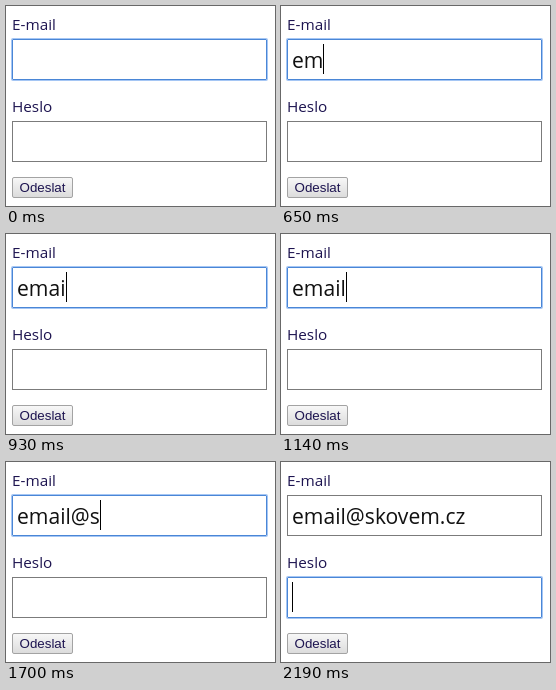
An HTML page that plays this animation: 269x200 px, repeating every 2680 ms.

```html
<!DOCTYPE html>
<html lang="cs">
<head>
<meta charset="utf-8">
<title>E-mail</title>
<style>
  html, body { margin: 0; width: 100%; height: 100%; overflow: hidden; background: #fff; }
  body { position: relative; font: 15.3px/20px "Open Sans", "Noto Sans", sans-serif; color: #1d1450; }
  label, .field, .button { position: absolute; left: 6px; box-sizing: border-box; white-space: pre; }
  .field {
    width: 255px; height: 41px; padding-left: 4px;
    border: 1px solid #7b7b7b;
    font-size: 21.1px; line-height: 39px; color: #111;
  }
  .focus { border-color: #4a86d6; border-radius: 1px; box-shadow: 0 0 0 1px #a5c6f4; }
  .caret { position: absolute; top: 4px; width: 1px; height: 30px; background: #000; visibility: hidden; }
  .typing .caret { visibility: visible; }
  .hint { color: #858585; }
  .button {
    top: 171px; width: 61px; height: 21px;
    border: 1px solid #a3a3a3; border-radius: 2px;
    background: linear-gradient(#f7f7f7, #dcdcdc);
    font: 13.33px/19px "Liberation Sans", Arial, sans-serif; text-align: center;
  }
</style>
</head>
<body>
  <label style="top:8px">E-mail</label>
  <div class="field" id="email" style="top:33px"><span id="typed"></span><i class="caret"></i><span class="hint" id="hint"></span></div>
  <label style="top:90px">Heslo</label>
  <div class="field" id="password" style="top:115px"><i class="caret"></i></div>
  <div class="button">Odeslat</div>
<script>
  const LOOP = 2680, HINT_AT = 1840, SUBMIT_AT = 2190;
  const ADDRESS = "email@skovem.cz";
  const KEYS = [580, 650, 790, 930, 1140, 1420, 1700];
  const $ = id => document.getElementById(id);

  function render(t) {
    const done = t >= SUBMIT_AT;
    const count = KEYS.filter(k => t >= k).length;
    // The "@" arrives with the sixth key, the first domain letter with the seventh.
    $("typed").textContent = done ? ADDRESS : ADDRESS.slice(0, count);
    $("hint").textContent = !done && t >= HINT_AT ? ADDRESS.slice(count) : "";
    $("email").classList.toggle("focus", !done);
    $("email").classList.toggle("typing", !done && count > 0);
    $("password").classList.toggle("focus", done);
    $("password").classList.toggle("typing", done);
  }

  const start = performance.now();
  function tick() {
    render((performance.now() - start) % LOOP);
    requestAnimationFrame(tick);
  }
  tick();
</script>
</body>
</html>
```
